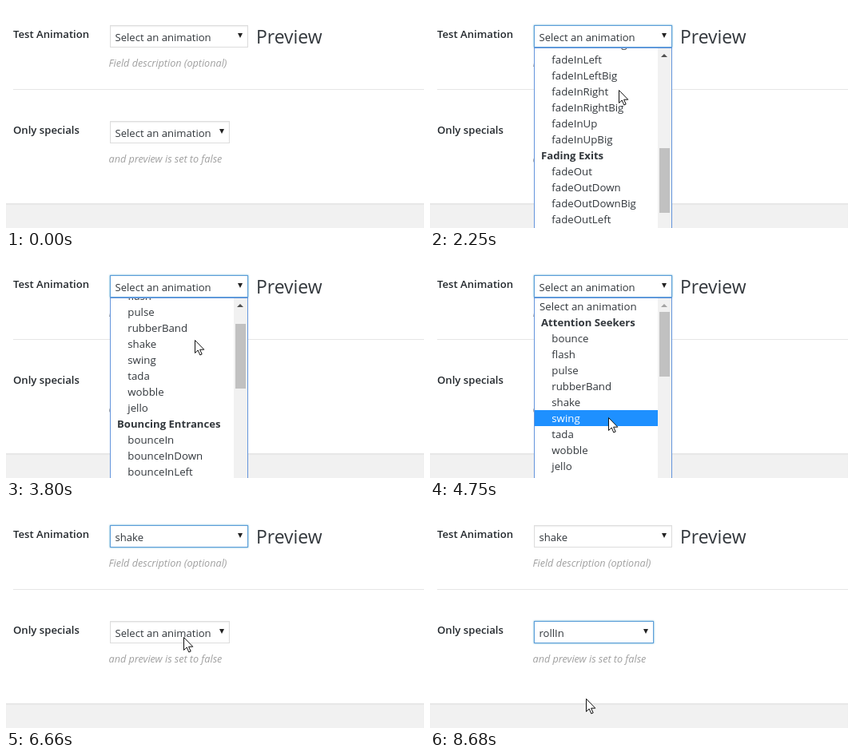
Animation of 523 by 278 pixels, one loop 8850 ms. Source, as an HTML page:

```html
<!DOCTYPE html>
<html lang="en">
<head>
<meta charset="utf-8">
<title>Animation picker</title>
<style>
  html, body { margin: 0; width: 100%; height: 100%; overflow: hidden; background: #fff; }
  body { position: relative; font: 13.1px/20px "Open Sans", "Noto Sans", sans-serif; color: #32373c; }
  body * { position: absolute; box-sizing: border-box; white-space: nowrap; }
  .label { left: 9px; font-size: 13.15px; font-weight: 600; color: #23282d; }
  .note { left: 128.5px; font-size: 12.65px; font-style: italic; color: #a0a0a0; }
  .rule { left: 9px; right: 0; top: 104px; height: 1px; background: #e6e6e6; }
  .footer { left: 0; right: 0; top: 247px; bottom: 0; background: #f1f1f1;
    border-top: 1px solid #e5e5e5; box-shadow: inset 0 1px 1px rgba(0,0,0,.04); }
  #preview { left: 313px; top: 24px; font-size: 22.9px; line-height: 30px; }
  .select { left: 130px; height: 28px; padding-left: 5.5px; line-height: 28px; background: #fff;
    border: 1px solid #ddd; box-shadow: inset 0 1px 2px rgba(0,0,0,.07); }
  .select.focus { border-color: #5b9dd9; box-shadow: 0 0 2px rgba(30,140,190,.8); }
  .select span { position: static; }
  .select i { right: 6px; top: 9px; border: 3.5px solid transparent; border-top: 6px solid #222; border-bottom: 0; }
  .list { left: 130px; background: #fff; border: 1px solid #6495dc; overflow: hidden; }
  .rows { left: 0; top: 0; width: 100%; font-size: 13.25px; }
  .rows div { position: static; height: 20px; padding-left: 21.3px; }
  .rows .first { padding-left: 6px; }
  .rows .group { padding-left: 8px; font-weight: 700; font-size: 13.15px; }
  .rows .on { background: #1e90ff; color: #fff; }
  .bar { right: 0; top: 0; width: 17px; height: 100%; background: #f1f1f1; }
  .bar i { left: 4px; top: 7px; border: 4px solid transparent; border-bottom: 4.5px solid #505050; border-top: 0; }
  .thumb { left: 2px; top: 17px; width: 13px; height: 81px; background: #c1c1c1; }
  #cursor { left: -1px; top: 0; overflow: visible; }
</style>
</head>
<body>
  <div class="label" style="top:25px">Test Animation</div>
  <div class="note" style="top:61px">Field description (optional)</div>
  <div class="rule"></div>
  <div class="label" style="top:145px">Only specials</div>
  <div class="note" style="top:181px">and preview is set to false</div>
  <div class="footer"></div>
  <div id="preview">Preview</div>
  <div class="select" id="selectA" style="top:24px;width:173px"><span></span><i></i></div>
  <div class="select" id="selectB" style="top:144px;width:150px"><span></span><i></i></div>
  <div class="list" id="listA" style="top:52px;width:173px;height:402px">
    <div class="rows" style="width:154px"></div>
    <div class="bar"><i></i><div class="thumb"></div></div>
  </div>
  <div class="list" id="listB" style="top:172px;width:150px;height:102px"><div class="rows"></div></div>
  <svg id="cursor" width="13" height="20">
    <path d="M.5 .5v16l3.7-3.5 2.6 6 2.4-1-2.6-5.8h5.2z" fill="#fff" stroke="#111"/>
  </svg>
<script>
const LOOP = 8850;
const PLACEHOLDER = 'Select an animation';
const ENTER = 70, OPEN_A = 690, PICK_A = 5660, OPEN_B = 6810, PICK_B = 8680;
const SCROLL_END = 2640, SCROLL_HOME = 3870, FAR = 800;
const ROW = 20;

// Each move glides to a new place and rests there until the next one
const pointerMoves = [
  { from: 70, to: 690, at: [264, 47] },
  { from: 860, to: 1200, at: [237, 105] },
  { from: 4130, to: 4750, at: [224, 202] },
  { from: 4900, to: 5430, at: [222, 183] },
  { from: 5660, to: 6510, at: [223, 164] },
  { from: 7150, to: 7700, at: [206, 260] },
  { from: 7700, to: 8130, at: [197, 226] },
  { from: 8220, to: 8450, at: [196, 241] }
];
const scrollMoves = [
  { from: 1140, to: 1540, at: [198] },
  { from: 1540, to: 2250, at: [535] },
  { from: 2250, to: SCROLL_END, at: [FAR] },
  { from: 2720, to: 3260, at: [642] },
  { from: 3260, to: SCROLL_HOME, at: [0] }
];

const $ = selector => document.querySelector(selector);
const clamp = v => Math.min(1, Math.max(0, v));
const linear = k => k;
const smooth = k => k * k * (3 - 2 * k);

function glide(start, moves, ease, t) {
  return moves.reduce((place, { from, to, at }) => {
    const k = ease(clamp((t - from) / (to - from)));
    return place.map((v, i) => v + (at[i] - v) * k);
  }, start).map(Math.round);
}

// Ten swings of 10px within one second
function shakeOffset(t) {
  const p = (t - PICK_A) / 100;
  return 10 * Math.cos(Math.PI * p) * clamp(Math.min(p, 10 - p));
}

const sides = ['Down', 'Left', 'Right', 'Up'];
const bigSides = sides.flatMap(side => [side, side + 'Big']);
const family = (name, ends) => ['', ...ends].map(end => name + end);
const groupsA = {
  'Attention Seekers': 'bounce flash pulse rubberBand shake swing tada wobble jello'.split(' '),
  'Bouncing Entrances': family('bounceIn', sides),
  'Bouncing Exits': family('bounceOut', sides),
  'Fading Entrances': family('fadeIn', bigSides),
  'Fading Exits': family('fadeOut', bigSides),
  'Flippers': family('flip', ['InX', 'InY', 'OutX', 'OutY']),
  'Lightspeed': ['lightSpeedIn', 'lightSpeedOut'],
  'Rotating Entrances': family('rotateIn', ['DownLeft', 'DownRight', 'UpLeft', 'UpRight'])
};
const groupsB = { 'Specials': ['hinge', 'rollIn', 'rollOut'] };

function fillRows(list, groups) {
  const add = (text, kind) => {
    const row = document.createElement('div');
    row.className = kind;
    row.textContent = text;
    $(list + ' .rows').append(row);
  };
  add(PLACEHOLDER, 'first');
  for (const [title, names] of Object.entries(groups)) {
    add(title, 'group');
    names.forEach(name => add(name, 'option'));
  }
}

// Above the first option the placeholder stays selected
function hoverRow(y) {
  const row = Math.floor(y / ROW);
  return row < 2 ? 0 : row;
}

function showList(list, open, active) {
  $(list).style.display = open ? '' : 'none';
  [...$(list + ' .rows').children].forEach((row, i) => row.classList.toggle('on', i === active));
}

function showSelect(select, value, focused) {
  $(select + ' span').textContent = value;
  $(select).classList.toggle('focus', focused);
}

function draw(t) {
  const [x, y] = glide([415, 110], pointerMoves, smooth, t);
  const [scroll] = glide([0], scrollMoves, linear, t);
  // The highlight is only refreshed when scrolling comes to rest
  const restScroll = t >= SCROLL_END && t < SCROLL_HOME ? FAR : 0;

  $('#cursor').style.display = t < ENTER ? 'none' : '';
  $('#cursor').style.transform = `translate(${x}px, ${y}px)`;
  $('#preview').style.transform = `translateX(${shakeOffset(t)}px)`;

  showSelect('#selectA', t < PICK_A ? PLACEHOLDER : 'shake', t >= OPEN_A && t < OPEN_B);
  showSelect('#selectB', t < PICK_B ? PLACEHOLDER : 'rollIn', t >= OPEN_B);
  showList('#listA', t >= OPEN_A && t < PICK_A, hoverRow(y - 53 + restScroll));
  showList('#listB', t >= OPEN_B && t < PICK_B, hoverRow(y - 173));

  $('#listA .rows').style.transform = `translateY(${-scroll}px)`;
  $('.thumb').style.transform = `translateY(${Math.round(scroll * 0.202)}px)`;
  $('.bar i').style.borderBottomColor = scroll ? '#505050' : '#a3a3a3';
}

fillRows('#listA', groupsA);
fillRows('#listB', groupsB);

const began = performance.now();
function tick() {
  draw((performance.now() - began) % LOOP);
  requestAnimationFrame(tick);
}
tick();
</script>
</body>
</html>
```
